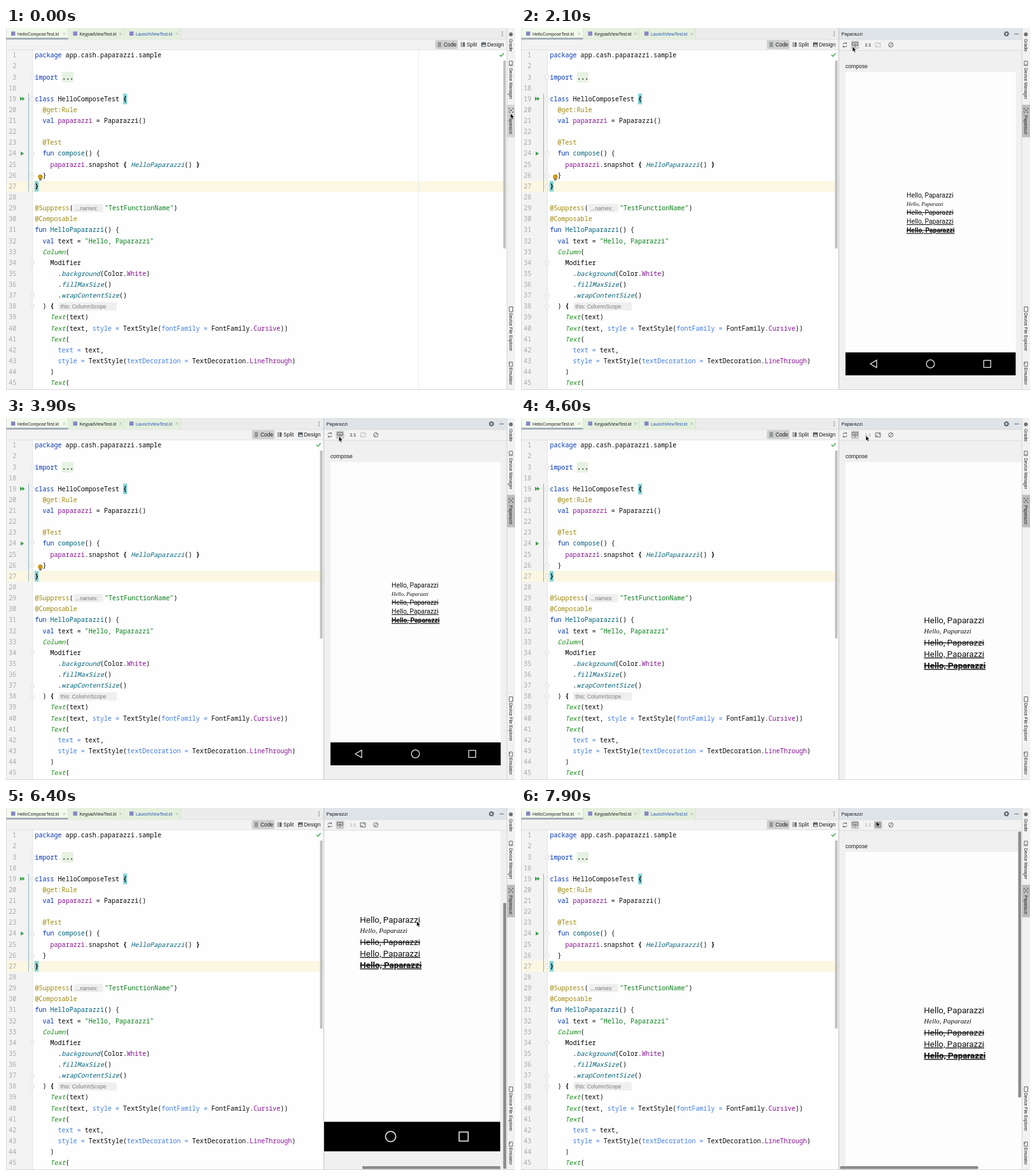
These frames come from a looping animation (800 px wide and 568 px high, 8 s). An HTML page:

```html
<!DOCTYPE html>
<html lang="en">
<head>
<meta charset="utf-8">
<title>Snapshot preview</title>
<style>
html, body { margin: 0; width: 100%; height: 100%; overflow: hidden; background: #f2f2f2; }
svg { display: block; width: 800px; height: 568px; }
text { white-space: pre; font-family: "Liberation Sans", Arial, sans-serif; fill: #1c1c1c; }
.code { font: 10.05px "Noto Sans Mono", "DejaVu Sans Mono", monospace; fill: #080808; }
.num { fill: #a8a8a8; text-anchor: end; }
.k { fill: #0033b3; }
.a { fill: #9e880d; }
.p { fill: #871094; }
.s { fill: #067d17; }
.f { fill: #00627a; }
.i { fill: #00627a; font-style: italic; }
.c { fill: #148a14; font-style: italic; }
.n { fill: #3f7be0; }
.b { font-weight: bold; }
.hint { font-size: 8.6px; fill: #7a7a7a; }
.app text { font-family: Roboto, sans-serif; font-size: 10.36px; fill: #111; }
.line { fill: none; stroke: #5f6468; stroke-width: 1; }
</style>
</head>
<body>
<svg id="stage" viewBox="0 0 800 568" xmlns="http://www.w3.org/2000/svg"></svg>
<script>
const LOOP = 8000, STEP = 100;
const ROW = 17.13, FIRST = 42.8, CODE_X = 45.4, CHAR = 6.03, ZOOM = 1.285;

// [style|text] marks a coloured run.
const source = [
  [1, "[k|package] app.cash.paparazzi.sample"],
  [2, ""],
  [3, "[k|import] "],
  [18, ""],
  [19, "[k|class] HelloComposeTest [b|{]"],
  [20, "  [a|@get:Rule]"],
  [21, "  [k|val] [p|paparazzi] = Paparazzi()"],
  [22, ""],
  [23, "  [a|@Test]"],
  [24, "  [k|fun] [f|compose]() {"],
  [25, "    [p|paparazzi].snapshot [b|{] [i|HelloPaparazzi]() [b|}]"],
  [26, "  }"],
  [27, "[b|}]"],
  [28, ""],
  [29, "[a|@Suppress](        [s|\"TestFunctionName\"])"],
  [30, "[a|@Composable]"],
  [31, "[k|fun] [f|HelloPaparazzi]() {"],
  [32, "  [k|val] text = [s|\"Hello, Paparazzi\"]"],
  [33, "  [c|Column](" ],
  [34, "    Modifier"],
  [35, "      .[i|background](Color.[p|White])"],
  [36, "      .[i|fillMaxSize]()"],
  [37, "      .[i|wrapContentSize]()"],
  [38, "  ) [b|{]"],
  [39, "    [c|Text](text)"],
  [40, "    [c|Text](text, [n|style =] TextStyle([n|fontFamily =] FontFamily.[p|Cursive]))"],
  [41, "    [c|Text]("],
  [42, "      [n|text =] text,"],
  [43, "      [n|style =] TextStyle([n|textDecoration =] TextDecoration.[p|LineThrough])"],
  [44, "    )"],
  [45, "    [c|Text]("]
];

const rect = (x, y, w, h, fill, extra = "") =>
  `<rect x="${x}" y="${y}" width="${w}" height="${h}" fill="${fill}" ${extra}/>`;
const label = (x, y, size, str, extra = "") =>
  `<text x="${x}" y="${y}" font-size="${size}" ${extra}>${str}</text>`;
const path = (d, extra = 'class="line"') => `<path d="${d}" ${extra}/>`;
const dot = (x, y, r, fill) => `<circle cx="${x}" cy="${y}" r="${r}" fill="${fill}"/>`;
const rowY = n => FIRST + ROW * source.findIndex(line => line[0] === n);
const colored = str => str.replace(/\[(\w)\|(.*?)\]/g, '<tspan class="$1">$2</tspan>');

function codeLines() {
  return source.map(([n, str]) => {
    const y = (rowY(n) + 3.5).toFixed(2);
    // The parameter hint is slightly wider than whole characters.
    const [head, tail] = n === 29 ? str.split(/ {8}/) : [str, ""];
    return `<text class="code num" x="16.3" y="${y}">${n}</text>` +
      `<text class="code" x="${CODE_X}" y="${y}">${colored(head)}</text>` +
      (tail && `<text class="code" x="155" y="${y}">${colored(tail)}</text>`);
  }).join("");
}

function gutter() {
  const folds = [3, 19, 24, 26, 27, 34, 37, 38].map(n => {
    const y = rowY(n);
    return rect(38.2, y - 3, 6, 6, "#fff", 'rx="1.5" stroke="#cfcfcf" stroke-width=".7"') +
      path(`M39.7 ${y}h3`, 'stroke="#bbb" stroke-width=".7"');
  }).join("");
  const run = (x, y, w = 5) => path(`M${x} ${y - 3.2}l${w} 3.2l-${w} 3.2z`, 'fill="#389f4a"');
  return path("M41.5 34V568", 'stroke="#dedede" stroke-width=".8"') + folds +
    path("M35.5 103V257", 'stroke="#8fb1bd"') +
    run(22, 111, 4) + run(25.5, 111, 4) + run(23.2, 197);
}

function tabs() {
  const tab = (x, w, name, tint, color) =>
    rect(x, 0, w, 18, tint) + rect(x + 8, 5.5, 6.5, 6.5, "#8587c4") +
    label(x + 18, 11.6, 6.9, name, `style="fill:${color}"`) +
    path(`M${x + w - 8} 7l4 4m0-4l-4 4`, 'stroke="#a4aaa2" stroke-width=".7" fill="none"') +
    path(`M${x + w} 0V18`, 'stroke="#d2d8ce" stroke-width=".7"');
  return tab(0, 97.5, "HelloComposeTest.kt", "#f2faec", "#222") +
    tab(97.5, 88.5, "KeypadViewTest.kt", "#e4efdd", "#222") +
    tab(186, 88.5, "LaunchViewTest.kt", "#e4efdd", "#2857b8") +
    rect(0, 15.4, 97.5, 2.6, "#9ba8b4");
}

// Controls anchored to the right edge of the editor.
function editorControls() {
  const bars = [23, 25, 27, 29].map(y => `M678.5 ${y}h5.5`).join("");
  return '<g id="controls">' +
    [6.2, 9.2, 12.2].map(y => dot(780, y, .8, "#555")).join("") +
    rect(674.5, 19, 35.5, 14, "#cecece", 'rx="2"') + path(bars) + label(688, 29, 8.4, "Code") +
    path("M714.5 23h3m-3 2h3m-3 2h3m-3 2h3") + rect(718.2, 22.5, 3, 7, "#5f6468") +
    label(724, 29, 8.4, "Split") +
    rect(747, 22.5, 7.5, 7, "#5f6468", 'rx=".6"') +
    path("M748 28.5l2-3 1.5 1.6 1-1 1.5 2.4z", 'fill="#f2f2f2"') + label(756.3, 29, 8.4, "Design") +
    path("M776 42l2.2 2.4 4.3-5", 'fill="none" stroke="#4aa657" stroke-width="1.5"') +
    rect(781.6, 51, 4, 295, "#bfbfbf", 'rx="1"') + "</g>";
}

function editor() {
  const hot = rowY(27);
  return rect(0, 0, 787, 568, "#fefefe") + rect(0, 34, 41.5, 534, "#f3f3f3") +
    rect(0, hot - 8.4, 787, 17, "#fbf7e3") +
    path("M648.5 34V568", 'stroke="#dfe6e3" stroke-width=".8"') +
    rect(87.5, rowY(3) - 8, 18.5, 16.5, "#e6f2e2", 'rx="2"') +
    label(CODE_X + 7 * CHAR + .6, rowY(3) + 3.5, 10, "...", 'class="code b"') +
    rect(CODE_X + 23 * CHAR, rowY(19) - 8.3, 6.2, 16.6, "#84d3d8") +
    rect(45, hot - 8.3, 6.2, 16.6, "#84d3d8") +
    rect(106.5, rowY(29) - 6.5, 46.5, 13, "#efefef", 'rx="2"') +
    label(109, rowY(29) + 3, 8.6, "...names:", 'class="hint"') +
    rect(82, rowY(38) - 6.5, 92, 13, "#efefef", 'rx="2"') +
    label(85.5, rowY(38) + 3, 8.6, "this: ColumnScope", 'class="hint"') +
    gutter() + codeLines() +
    `<g id="bulb">${dot(54, 233.6, 3.8, "#c99a1e")}${rect(52.3, 236.5, 3.4, 2.8, "#77715e")}</g>` +
    rect(0, 0, 787, 18, "#ececec") + rect(0, 18, 787, 16, "#f2f2f2") +
    path("M0 18H787M0 34.3H787", 'stroke="#d9d9d9" stroke-width=".7"') +
    tabs() + editorControls();
}

function preview() {
  const hello = (y, extra = "") => label(96, y, 10.36, "Hello, Paparazzi", extra);
  const deco = (value, weight = 400) => `style="text-decoration:${value};font-weight:${weight}"`;
  const nav = 'fill="none" stroke="#e4e4e4" stroke-width="1.3"';
  return label(0, -6.5, 8.6, "compose", 'id="caption"') +
    '<g id="page" class="app">' + rect(0, 0, 267.5, 476, "#fdfdfd") +
    hello(197) +
    hello(209.5, 'style="font:italic 8.55px \'Liberation Serif\',serif"') +
    hello(224, deco("line-through")) + hello(238, deco("underline")) +
    hello(252, deco("underline line-through", 700)) +
    rect(0, 440, 267.5, 36, "#000") +
    path("M39 458l10-5.8v11.6z", nav) +
    `<circle cx="133.5" cy="458" r="6.3" ${nav}/>` +
    rect(217.3, 452.5, 11, 11, "none", 'stroke="#e4e4e4" stroke-width="1.3"') + "</g>";
}

function panel() {
  return '<g id="panel">' + rect(499, 0, 288, 568, "#f0f0f0") +
    `<g clip-path="url(#view)"><g id="content">${preview()}</g></g>` +
    rect(781.5, 0, 4.6, 417, "#8b8b8b", 'id="vbar" rx="1"') +
    rect(0, 562, 217, 4.4, "#8b8b8b", 'id="hbar" rx="1"') +
    rect(500, 0, 287, 18, "#dfe4e9") + rect(500, 18, 287, 17, "#f2f2f2") +
    path("M500 18H787M500 35.2H787", 'stroke="#d2d2d2" stroke-width=".7"') +
    label(503.5, 12, 7.5, "Paparazzi") +
    '<circle cx="763" cy="9.2" r="2.5" fill="none" stroke="#5f6468" stroke-width="1.7"/>' +
    '<circle cx="763" cy="9.2" r="3.6" fill="none" stroke="#5f6468" stroke-width="1.2" stroke-dasharray="1.4 1.43"/>' +
    path("M775.5 9.3h7") +
    path("M505.8 25.8a3.2 3.2 0 0 1 5.8-1.2v-2m0 2h-2M512.2 27.3a3.2 3.2 0 0 1-5.8 1.2v2m0-2h2") +
    rect(518.5, 20, 13, 13, "#cdcdcd", 'rx="2"') +
    path("M523 27.2h-2.2v-4.5h8.4v4.5H527M525 30.5v-5.6m-2 2l2-2 2 2") +
    rect(538.5, 20, 13, 13, "#d9d9d9", 'rx="2" id="oneHover"') +
    label(540.6, 29, 6.6, "1:1", 'class="b" id="oneToOne"') +
    rect(554.7, 20, 13, 13, "#c9c9c9", 'rx="2" id="fitHover"') +
    `<g id="fit">${path("M557.2 23.2h7.6v6.6h-7.6zM559 27v1.2h1.4M563 26v-1.2h-1.4")}</g>` +
    '<circle cx="581.3" cy="26.5" r="3.5" class="line"/>' + path("M579 29l4.6-5") +
    path("M499.5 0V568", 'stroke="#c4c4c4"') + "</g>";
}

function sidebar() {
  const side = (y, str) =>
    `<text transform="translate(791.2 ${y}) rotate(90)" font-size="6.7">${str}</text>`;
  return rect(787, 0, 13, 568, "#f1f1f1") + rect(787, 120.5, 13, 51, "#bdbdbd", 'id="sideTab"') +
    path("M787.3 0V568", 'stroke="#cfcfcf" stroke-width=".8"') +
    dot(793.5, 10, 3, "#6a7074") + side(17, "Gradle") +
    path("M791 52h5v7h-5zM792.5 57.5h2") + side(63, "Device Manager") +
    path("M790.5 128v-2h2m2.500 0h2v2m0 2.500v2h-2m-2.500 0h-2v-2") + dot(793.7, 129.200, 1.3, "#5f6468") +
    side(137, "Paparazzi") +
    path("M791 437.500h5.500v7.500h-5.500z") + side(447, "Device File Explorer") +
    path("M791 524h5v7h-5zM790 526h3") + side(533, "Emulator");
}

const tooltip = '<g id="tooltip">' + rect(520.5, 46.5, 146, 18, "#000", 'opacity=".1" rx="3"') +
  rect(521, 45, 145, 18, "#f6f6f6", 'rx="2" stroke="#c6c6c6" stroke-width=".8"') +
  label(527, 57.2, 8.57, "Show Screenshots for Current File") + "</g>";

const stage = document.getElementById("stage");
stage.innerHTML = '<clipPath id="view"><rect x="500" y="35" width="287" height="533"/></clipPath>' +
  editor() + panel() + sidebar() + tooltip +
  path("M0 0v8.300l1.900-1.700 1.300 3 1.500-.7-1.300-2.800h2.600z",
    'id="cursor" fill="#000" stroke="#fff" stroke-width=".6"') +
  path("M0 567.500H800M.4 0V568", 'stroke="#d0d0d0" stroke-width=".8"');

const part = Object.fromEntries([...stage.querySelectorAll("[id]")].map(el => [el.id, el]));
const show = (el, on) => { el.style.display = on ? "" : "none"; };
const move = (el, x, y, s = 1) => el.setAttribute("transform", `translate(${x} ${y}) scale(${s})`);

// Eased interpolation through [time, value...] keys.
function track(keys, t) {
  const next = keys.findIndex(key => key[0] > t);
  if (next === 0) return keys[0].slice(1);
  if (next < 0) return keys[keys.length - 1].slice(1);
  const from = keys[next - 1], to = keys[next];
  const u = (t - from[0]) / (to[0] - from[0]), e = u * u * (3 - 2 * u);
  return from.slice(1).map((v, i) => v + (to[i + 1] - v) * e);
}

const cursorKeys = [
  [900, 793, 134], [1300, 638.5, 97.5], [1500, 638.5, 97.5], [2000, 521, 29],
  [3800, 521, 29], [4300, 542, 27.5], [4700, 542, 27.5], [5300, 645.5, 177.5],
  [7250, 645.5, 177.5], [7800, 558.5, 21]
];
const scrollX = [[5400, 0], [5700, 77], [6700, 77], [7150, 0]];
const scrollY = [[5800, 0], [6350, 142], [6550, 142], [7000, 0]];

function render(t) {
  const open = t >= 400, zoomed = t >= 4600;
  const [x, y] = track(cursorKeys, t);
  const [sx] = track(scrollX, t), [sy] = track(scrollY, t);
  const over = left => y < 34 && y > 19 && x >= left && x < left + 13;

  show(part.panel, open);
  move(part.controls, open ? -288 : 0, 0);
  part.sideTab.setAttribute("fill", t < 100 ? "#d5d5d5" : "#bdbdbd");
  show(part.bulb, !zoomed);
  show(part.tooltip, t >= 2500 && t < 3900);

  move(part.content, 510 - sx, 69 - sy);
  move(part.page, 0, 0, zoomed ? ZOOM : 1);
  part.oneToOne.style.fill = zoomed ? "#b4b4b4" : "#4f5458";
  part.fit.setAttribute("opacity", zoomed ? 1 : .35);
  show(part.oneHover, !zoomed && over(538.5));
  show(part.fitHover, zoomed && over(554.7));

  show(part.hbar, t > 5400);
  show(part.vbar, t > 5800);
  part.hbar.setAttribute("x", 501.5 + sx * 58.5 / 77);
  part.vbar.setAttribute("y", 37 + sy * 112 / 142);
  move(part.cursor, x, y);
}

const start = performance.now();
function tick() {
  const t = (performance.now() - start) % LOOP;
  render(Math.floor(t / STEP) * STEP);
  requestAnimationFrame(tick);
}
tick();
</script>
</body>
</html>
```
